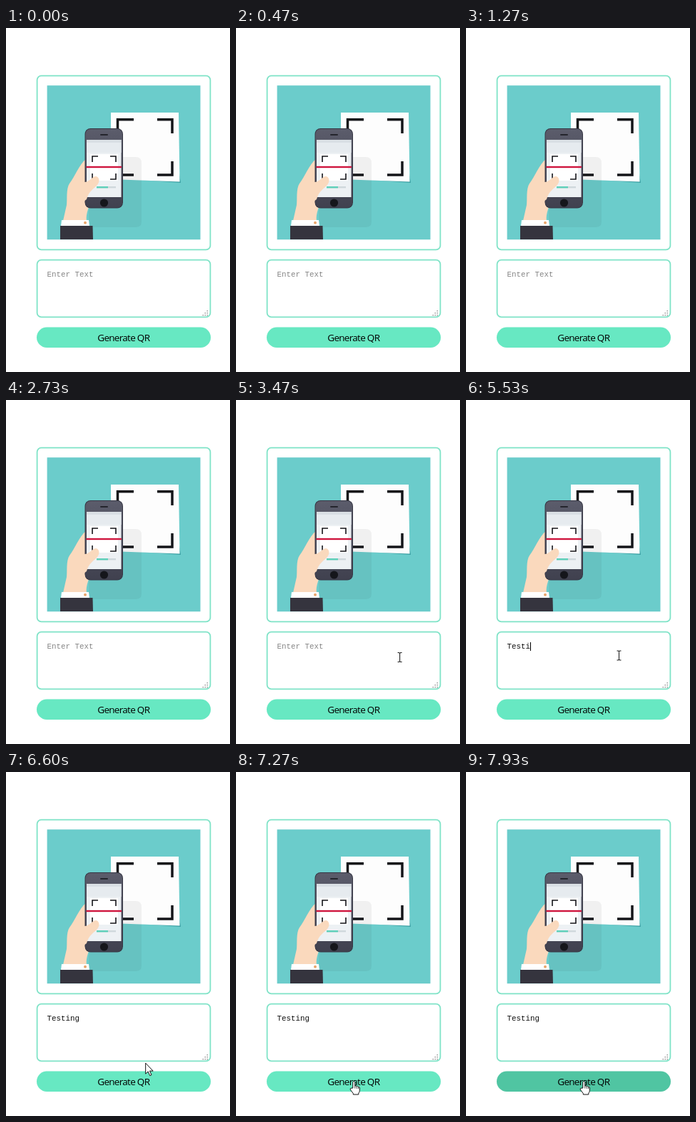
An HTML page for the animation above (8 s loop, 314 by 480 pixels).

```html
<!DOCTYPE html>
<html lang="en">
<head>
<meta charset="utf-8">
<title>QR generator</title>
<style>
  html, body { margin: 0; width: 100%; height: 100%; overflow: hidden; background: #fff; }
  svg { display: block; }
  .box { fill: #fff; stroke: #7fe3c7; stroke-width: 1.8; }
  .mono { font: 10.83px "Liberation Mono", "Courier New", monospace; }
  .label { font: 13.5px "Open Sans", "Noto Sans", sans-serif; letter-spacing: -.7px; }
  .frame { fill: none; stroke: #141519; }
  .skin { fill: #fad9bd; }
  .pointer { stroke: #111; stroke-width: 1; stroke-linejoin: round; fill: #fff; }
</style>
</head>
<body>
<svg width="314" height="480" viewBox="0 0 314 480">
  <defs>
    <linearGradient id="body" x1="0" y1="0" x2="0" y2="1">
      <stop offset="0" stop-color="#5b5c6b"/>
      <stop offset="1" stop-color="#40414f"/>
    </linearGradient>
  </defs>

  <rect class="box" x="43.6" y="66.6" width="242.8" height="242.8" rx="6"/>

  <g id="picture">
    <rect x="57.6" y="80.2" width="214.9" height="215" fill="#6bcccb"/>
    <path d="M160 210L243 203L245 216Z" fill="#399fa3"/>
    <path d="M147 118H242L243.5 214.5L147 211Z" fill="#fdfdfd"/>
    <path class="frame" stroke-width="3.5" d="M156.5 147V127.7H179M212 127.7H233V147M233 186V205H212M179 205H160"/>
    <path d="M164 180H182Q190 180 190 188V270Q190 278 182 278H116V240Z" opacity=".05"/>

    <path class="skin" d="M112 183C103 190 96 208 89 217C84 224 86 240 85 247L80 269H113C112 262 114 256 116 250Z"/>
    <rect x="110.5" y="140" width="53.5" height="111.5" rx="8" fill="#363744"/>
    <rect x="111.5" y="141" width="51.5" height="109.5" rx="7" fill="url(#body)"/>
    <rect x="132" y="148" width="11" height="2" rx="1" fill="#24252d"/>
    <rect x="113" y="156" width="48.5" height="80" fill="#edf1f4"/>
    <rect x="113" y="156" width="48.5" height="4" fill="#d9dfe4"/>
    <rect x="113" y="160" width="48.5" height="14" fill="#e6ebef"/>
    <rect x="118" y="176" width="39" height="37" fill="#fff"/>
    <path class="frame" stroke-width="1.6" d="M121 187V179H129M146 179H154V187M154 203V211H146M129 211H121V203"/>
    <rect x="127" y="221" width="27" height="2.4" fill="#cfd8dc"/>
    <rect x="127" y="221" width="16" height="2.4" fill="#5fd0ba"/>
    <rect x="112.5" y="192.8" width="49.5" height="2.4" fill="#cf173f"/>
    <circle cx="137.5" cy="244" r="5.6" fill="#15161b"/>
    <path class="skin" d="M109 215C116 216 121 207 126 207C131 208 132 214 128 219C124 224 116 227 113 239L109 242Z"/>
    <path d="M78 268H116L117 276.5H77Z" fill="#fff"/>
    <circle cx="111" cy="271.8" r="2" fill="#e9a66c"/>
    <path d="M76 276H121.5L122 295H76Z" fill="#35343e"/>
  </g>

  <rect class="box" x="43.6" y="323.6" width="242.8" height="79.8" rx="6"/>
  <g id="grip" fill="#9a9a9a"></g>
  <text id="entry" class="mono" x="57.5" y="347"></text>
  <rect id="caret" y="338" width="1" height="12"/>

  <rect id="button" x="43" y="417.5" width="244" height="28.5" rx="14.25"/>
  <text class="label" x="164.8" y="437" text-anchor="middle">Generate QR</text>

  <g id="arrow" class="pointer"><path d="M0 0V15L3.5 11.8L6 17.5L8.3 16.5L5.8 11H10.5Z"/></g>
  <g id="beam" fill="none">
    <path d="M-3 -6.5H-1L0 -5.5L1 -6.5H3M0 -5.5V5.5M-3 6.5H-1L0 5.5L1 6.5H3" stroke="#222" stroke-width="1.1"/>
  </g>
  <g id="hand" class="pointer">
    <path d="M-1.5 9.5V1.3Q-1.5 0 0 0Q1.5 0 1.5 1.3V6.5Q2.7 5.7 4 6.9Q5.4 6.3 6.3 7.8Q8 7.5 8 9.5V13Q8 15.3 6.5 16.6V18.5H-1V17L-5 11.8Q-5.6 9.8 -3.9 9.7Z"/>
    <path d="M1.5 6.5V10M4 7V10.3M6.3 8V10.5" fill="none" stroke-width=".8"/>
  </g>
</svg>
<script>
const LOOP = 8000, PRESS = 7900, FOCUS = 4570;
const WORD = "Testing";
const keyTimes = [4760, 4930, 5120, 5340, 5470, 5610, 5750];
const CHAR = 6.5;

// time, x, y of the pointer's hot spot
const path = [
  [3230, 322, 372], [3520, 222, 358], [3800, 214.5, 356.5],
  [6330, 214.5, 356.5], [6880, 176, 458], [7020, 173, 453], [7230, 165.3, 431.5]
];

const $ = id => document.getElementById(id);
const ease = u => u * u * (3 - 2 * u);
const show = (id, on) => $(id).setAttribute("visibility", on ? "visible" : "hidden");

for (let row = 0; row < 3; row++)
  for (let col = 0; col <= row; col++) {
    const dot = document.createElementNS("http://www.w3.org/2000/svg", "rect");
    const attrs = { x: 281.5 - col * 3, y: 394 + row * 3, width: 1.5, height: 1.5 };
    for (const name in attrs) dot.setAttribute(name, attrs[name]);
    $("grip").append(dot);
  }

function pointerAt(t) {
  if (t < path[0][0]) return null;
  for (let i = 1; i < path.length; i++) {
    const [t0, x0, y0] = path[i - 1], [t1, x1, y1] = path[i];
    if (t < t1) {
      const u = ease((t - t0) / (t1 - t0));
      return [x0 + (x1 - x0) * u, y0 + (y1 - y0) * u];
    }
  }
  return path[path.length - 1].slice(1);
}

function pointerKind(p) {
  if (!p) return "";
  const [x, y] = p;
  if (x < 43 || x > 287) return "arrow";
  if (y > 323 && y < 405) return "beam";
  return y > 417 && y < 446 ? "hand" : "arrow";
}

function draw(t) {
  const typed = keyTimes.filter(k => k <= t).length;
  const entry = $("entry");
  entry.textContent = typed ? WORD.slice(0, typed) : "Enter Text";
  entry.setAttribute("fill", typed ? "#111" : "#868686");

  const lastKey = typed ? keyTimes[typed - 1] : FOCUS;
  const focused = t >= FOCUS && t < PRESS;
  show("caret", focused && (t - lastKey) % 1000 < 500);
  $("caret").setAttribute("x", 57.5 + typed * CHAR);

  $("button").setAttribute("fill", t >= PRESS ? "#50c5a2" : "#67e8c2");

  const p = pointerAt(t), kind = pointerKind(p);
  for (const id of ["arrow", "beam", "hand"]) {
    show(id, id === kind);
    if (id === kind) $(id).setAttribute("transform", `translate(${p[0]} ${p[1]})`);
  }
}

function tick() {
  draw(performance.now() % LOOP);
  requestAnimationFrame(tick);
}
tick();
</script>
</body>
</html>
```
